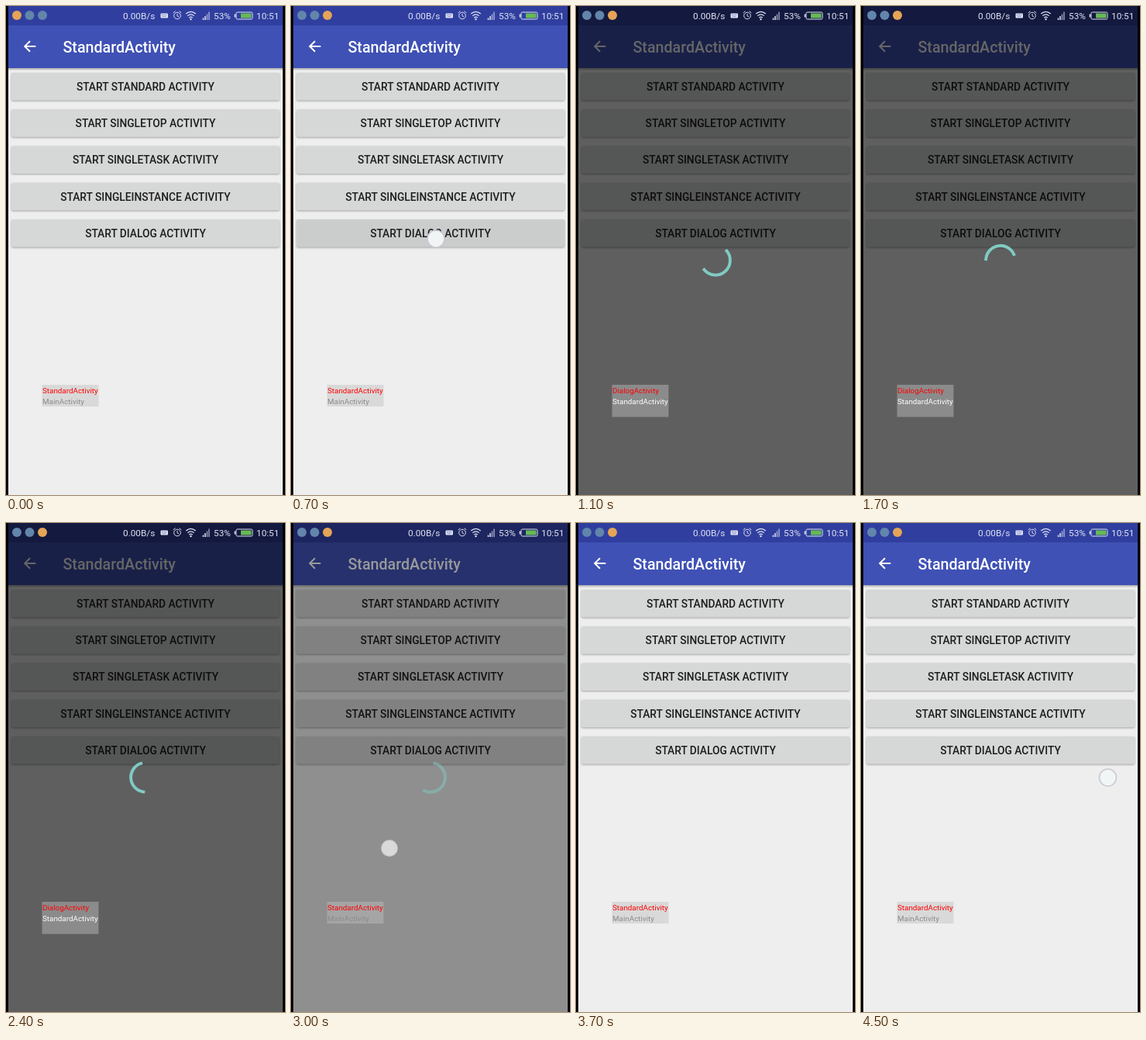
These frames come from a looping animation (360x630 px, 4700 ms). An HTML page:

```html
<!DOCTYPE html>
<html lang="en">
<head>
<meta charset="utf-8">
<title>Activity stack</title>
<style>
  html, body { margin: 0; height: 100%; overflow: hidden; background: #000; }
  svg { display: block; width: 100vw; height: 100vh; }
  text { font-family: Roboto, "Liberation Sans", sans-serif; }
  .title { font-size: 19.67px; font-weight: 500; fill: #fff; }
  .button { font-size: 13.77px; font-weight: 500; fill: #1d1d1d; text-anchor: middle; }
  .status { font-size: 11.8px; fill: #dfe2f2; }
  .stack { font-size: 9.83px; }
  .raised { filter: drop-shadow(0 1px 1px rgba(0, 0, 0, .32)); }
  .line { fill: none; stroke: #dfe2f2; }
</style>
</head>
<body>
<svg viewBox="0 0 360 630">
  <rect width="360" height="630"/>
  <rect x="3" width="354" height="630" fill="#eee"/>
  <g id="buttons"></g>

  <defs>
    <linearGradient id="shade" x2="0" y2="1">
      <stop stop-opacity=".32"/>
      <stop offset="1" stop-opacity="0"/>
    </linearGradient>
  </defs>
  <rect x="3" y="79.5" width="354" height="4" fill="url(#shade)"/>
  <rect x="3" width="354" height="80" fill="#3f51b5"/>
  <rect x="3" width="354" height="25" fill="#303f9f"/>
  <path d="M38.3 52H24.5M31 45.2L24.2 52L31 58.8" fill="none" stroke="#fff" stroke-width="2"/>
  <text class="title" x="73.5" y="59.5">StandardActivity</text>

  <rect id="dim" x="3" width="354" height="630" opacity="0"/>
  <path id="spinner" fill="none" stroke="#80cbc4" stroke-width="3.9" stroke-linecap="square"/>

  <!-- status bar -->
  <g id="badges">
    <circle cx="14" cy="12" r="6"/>
    <circle cx="30.5" cy="12" r="6"/>
    <circle cx="47" cy="12" r="6"/>
  </g>
  <text class="status" x="151" y="17">0.00B/s</text>
  <rect x="199.5" y="9.5" width="9.5" height="6" rx="1" fill="#dfe2f2"/>
  <path d="M201 11.5h6.5M202 13.5h4.5" stroke="#5a65b0" stroke-dasharray="1 .7"/>
  <g class="line">
    <circle cx="221" cy="12.5" r="4.3"/>
    <path d="M221 10v2.8l2 1.2M215.7 9l2.8-2.4M226.3 9l-2.8-2.4"/>
    <path d="M232.2 10q6.3-5.4 12.6 0M234.2 12.6q4.3-3.6 8.6 0M236.2 15q2.3-1.8 4.6 0" stroke-width="1.2"/>
    <path d="M254.5 18v-2.5M257 18v-5" stroke-width="1.5"/>
    <path d="M259.5 18v-7.5M262 18v-10.5" stroke-width="1.5" opacity=".65"/>
    <rect x="297" y="8" width="21" height="9" rx="1.5"/>
    <path d="M295.5 10.5v4" stroke-width="1.6"/>
  </g>
  <circle cx="238.5" cy="17" r="1.2" fill="#dfe2f2"/>
  <rect x="303" y="9.5" width="13.5" height="6" fill="#66b957"/>
  <text class="status" x="268" y="17">53%</text>
  <text class="status" x="323" y="17">10:51</text>

  <!-- floating activity list -->
  <rect id="panel" x="46.5" y="488" width="73" height="28" fill="#c0c0c0" opacity=".455"/>
  <text class="stack" id="row0" x="47" y="498.5" fill="#f00"></text>
  <text class="stack" id="row1" x="47" y="512.5"></text>
  <text class="stack" id="row2" x="47" y="526" fill="#8c8c8c"></text>

  <circle id="touch"/>
</svg>
<script>
const LOOP = 4700;
const LATE_STEPS = [3300, 3500, 3700, 3900, 4100, 4200, 4400, 4500];
const GREY = '#8c8c8c', ORANGE = '#e5a456', BLUE = '#6285ab';
const $ = id => document.getElementById(id);
const clamp = (v, lo, hi) => Math.min(hi, Math.max(lo, v));

function set(el, attrs) {
  for (const name in attrs) el.setAttribute(name, attrs[name]);
}

$('buttons').innerHTML = ['STANDARD', 'SINGLETOP', 'SINGLETASK', 'SINGLEINSTANCE', 'DIALOG']
  .map((name, i) => {
    const y = 86 + 47.25 * i;
    return `<rect class="raised" x="7" y="${y}" width="346" height="35.4" rx="2" fill="#d6d7d7"/>
      <text class="button" x="180" y="${y + 22.8}">START ${name} ACTIVITY</text>`;
  }).join('');
const dialogButton = $('buttons').querySelector('rect:last-of-type');

// Material fast-out-slow-in curve: cubic-bezier(.4, 0, .2, 1)
function ease(x) {
  let lo = 0, hi = 1;
  for (let i = 0; i < 20; i++) {
    const s = (lo + hi) / 2, r = 1 - s;
    if (1.2 * r * r * s + .6 * r * s * s + s ** 3 < x) lo = s; else hi = s;
  }
  return 3 * (1 - lo) * lo * lo + lo ** 3;
}

function arc(time) {
  const p = time % 1333 / 1333;
  const turn = -90 + p * 90 + time * 720 / 6665;
  const from = turn + 270 * ease(clamp(2 * p - 1, 0, 1));
  const to = turn + 270 * ease(clamp(2 * p, 0, 1)) + .5;
  const point = deg => {
    const a = deg * Math.PI / 180;
    return `${180 + 18.9 * Math.cos(a)} ${327.7 + 18.9 * Math.sin(a)}`;
  };
  return `M${point(from)}A18.9 18.9 0 ${to - from > 180 ? 1 : 0} 1 ${point(to)}`;
}

function drawTouch(t) {
  const at = (x, y, r, fill, stroke) =>
    set($('touch'), { cx: x, cy: y, r, fill, stroke, 'stroke-width': 1.5, opacity: 1 });
  if (t >= 500 && t < 800) at(187, 300, 11, '#f0f4f5', '#c8c8d2');
  else if (t >= 2900 && t < 3200) at(127, 419, 10, '#dadada', '#d2d2d2');
  else if (t >= 4500) at(318.5, 328, 11, '#f0f5f5', '#c8c8d2');
  else set($('touch'), { opacity: 0 });
}

function draw(t) {
  const dim = clamp(.0021 * Math.min(t - 815, 3190 - t), 0, .6);
  set($('dim'), { opacity: dim });
  set($('spinner'), {
    d: arc(Math.max(0, t - 815)),
    opacity: t < 2000 ? Math.min(1, dim * 2.5) : clamp((dim - .2) * 2.5, 0, 1)
  });
  set(dialogButton, { fill: t >= 500 && t < 1000 ? '#cbcccc' : '#d6d7d7' });

  const rows = ['StandardActivity', 'MainActivity'];
  const open = t >= 900 && t < 3000;
  if (open) rows.unshift('DialogActivity');
  for (let i = 0; i < 3; i++) $('row' + i).textContent = rows[i] || '';
  set($('row1'), { fill: open ? '#fff' : GREY });
  set($('panel'), { height: open ? 41.5 : 28 });

  const orange = t < 300 ? 0 : 2;
  [...$('badges').children].forEach((dot, i) => set(dot, { fill: i === orange ? ORANGE : BLUE }));
  drawTouch(t);
}

// The screen refreshes in 100 ms steps, then at a few later moments.
function step(t) {
  return t < 3300 ? Math.floor(t / 100) * 100 : LATE_STEPS.filter(s => s <= t).pop();
}

const start = performance.now();
function frame() {
  draw(step((performance.now() - start) % LOOP));
  requestAnimationFrame(frame);
}
frame();
</script>
</body>
</html>
```
